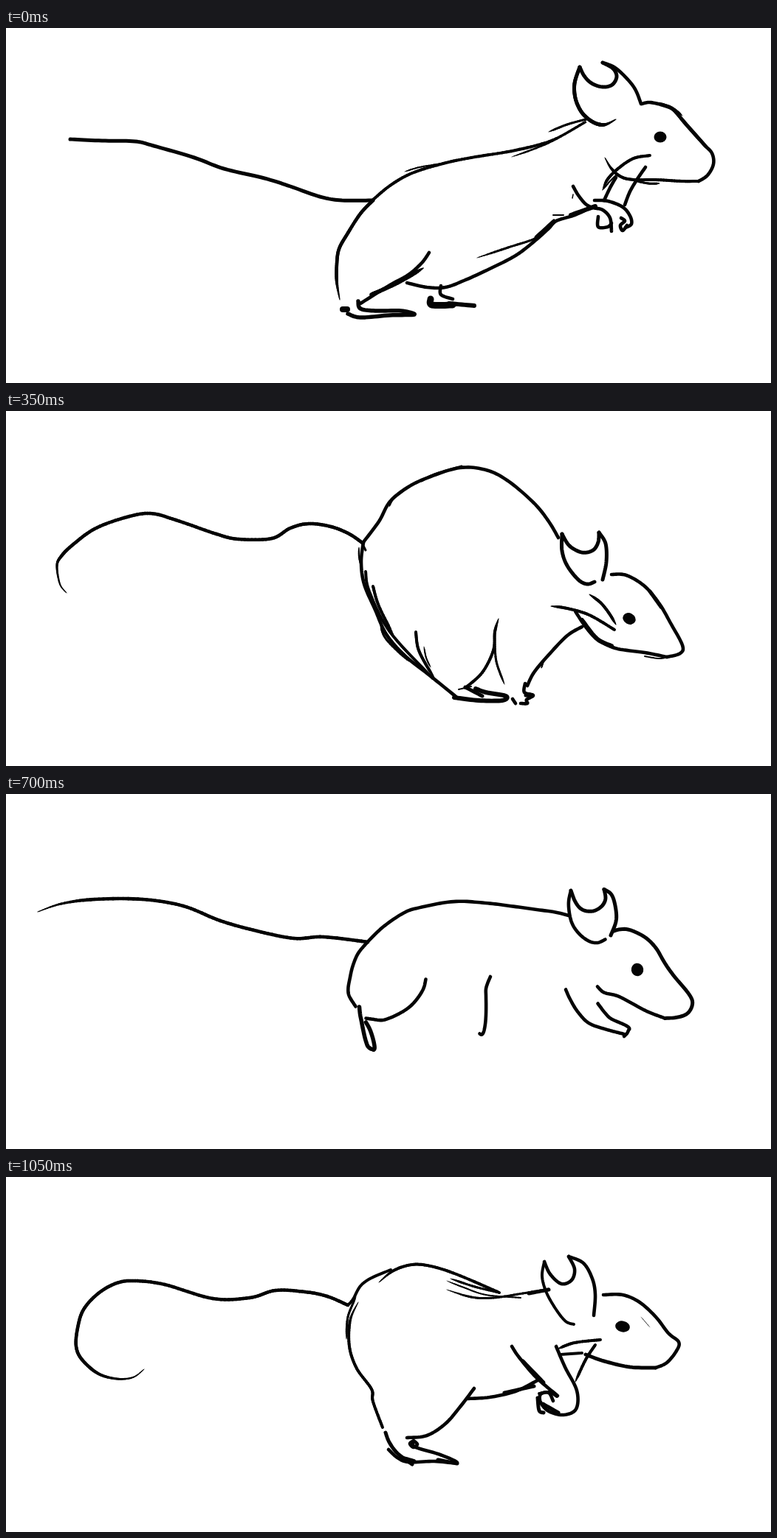
These frames come from a looping animation (1036x482 px, 1120 ms). An HTML page with a canvas:

```html
<!DOCTYPE html>
<html lang="en">
<head>
<meta charset="utf-8">
<title>Running mouse</title>
<style>
html, body { margin: 0; width: 100%; height: 100%; overflow: hidden; background: #fff; }
canvas { display: block; }
</style>
</head>
<body>
<canvas id="stage" width="1036" height="482"></canvas>
<script>
const ctx = document.getElementById('stage').getContext('2d');
const STEP = 70;
const LINE = 4.6;

// A stroke is "width flags: x,y x,y ..."; "<" thins its start, ">" its end.
// Eyes are [x, y, rx, ry, tilt], one for each lap of the run.
const push = {
  eyes: [[886, 148, 8.5, 7.5, 0]],
  tail: '5:87,151 130,153 175,154 200,160 255,176 295,191 350,204 385,215 425,229 455,234 497,234',
  back: '4>:495,235 520,214 550,197 592,184 630,176 690,166 740,152 788,124',
  rump: '>:497,234 480,252 462,280 451,300 448,320 448,345 452,369',
  ear: '5>:777,53 770,75 771,95 778,112 788,123 800,130 812,131 826,124',
  earIn: '5:777,53 783,65 793,75 808,80 821,77 827,66 822,55 808,47',
  earOut: '808,47 825,54 843,71 853,85 860,103',
  head: '861,103 872,101 890,105 905,112 920,130 945,158 956,170 958,185 950,200 938,208',
  jaw: '4>:938,208 915,208 880,206 850,206 833,202 820,191 811,176',
  cheek: '4>:872,173 850,177 830,190 815,205 808,220',
  arm: '768,215 775,227 785,239 795,244 808,247 818,258 820,276',
  paw: '797,234 815,235 835,243 845,255 847,266 839,271',
  belly: '796,242 770,254 745,262 735,272 715,290 690,309 655,327 620,343 595,352 570,352 543,346',
  haunch: '573,305 563,319 545,335 520,349 480,374',
  foot: '5.5:477,371 480,381 500,384 535,384 553,389 520,390 480,393 463,388',
  marks: ['3<:735,141 760,131 785,124', '2.5<:685,175 735,156 785,128', '2<:540,195 560,189 590,184',
    '3<>:880,101 900,107 916,119', '905,112 948,161', '3<>:850,207 870,211 885,211',
    '866,189 855,205 845,222 838,240', '810,234 818,217 826,203', '2<:808,220 818,208 828,198',
    '802,256 802,270 815,270 820,265', '833,258 838,262 832,268 835,275 841,268',
    '3<:638,312 680,298 720,284 745,262', '6:765,254 798,242', '2:741,254 755,254',
    '5:718,284 742,262', '1.5:768,226 767,231', '5.5<:565,326 530,346 495,362',
    '8:456,382 462,382', '589,350 589,362 605,368', '9:575,368 577,376 605,376', '6:600,374 634,377']
};

const leap = {
  eyes: [[893, 174, 7.5, 7, 0]],
  tail: '74,160 95,163 120,159 150,151 185,154 235,166 262,187 308,193 345,210 380,222 410,225 443,237 490,244',
  back: '490,244 515,223 560,197 605,171 660,151 700,139 755,124 781,123',
  rump: '490,244 470,265 460,290 455,315 452,335 456,350 475,368',
  ear: '782,82 780,100 787,125 800,145 815,156 828,156 837,149',
  earIn: '5:782,82 790,98 803,108 820,107 832,98 835,85 831,70',
  earOut: '5:831,70 845,80 855,97 859,112 856,130',
  head: '5:856,130 875,127 895,137 910,155 925,178 955,207 964,222 962,238 950,246 935,248',
  jaw: '935,248 910,239 885,228 848,218',
  cheek: '865,191 850,195 832,210 820,225 813,242',
  arm: '781,211 787,225 800,244 820,258 850,255 882,251',
  paw: '805,226 815,239 825,244 855,240 875,243 882,249 882,256',
  belly: '787,235 765,242 748,250 735,263 715,282 690,302 660,322 630,337 605,342 578,341',
  haunch: '562,295 556,312 540,332 520,347 483,366',
  foot: '5.5:483,366 490,377 510,390 540,391 510,394 478,390',
  marks: ['1.5:68,158 69,158', '2<>:575,197 605,177 632,162', '5>:585,182 607,171 630,164',
    '7:450,322 450,342 457,352', '2:466,287 468,272', '4:781,211 800,201 825,196 850,196 854,199',
    '6:875,127 896,137', '5:910,155 956,208', '5:745,248 780,235', '2<>:669,321 705,293 750,255',
    '3:720,271 750,253', '6:462,362 475,376 500,392', '5:467,373 482,388 525,395',
    '6:484,370 510,390', '5:553,333 578,345', '7:582,350 576,359 588,371', '5:588,371 594,380 604,385',
    '3:595,354 588,358 587,368']
};

const dive = {
  eyes: [[822, 311, 6.5, 9, -.4], [817, 303, 9, 10.5, -.3]],
  tail: '<:55,179 60,163 75,147 95,137 120,132 165,133 220,136 265,144 310,155 340,168 365,178 390,177 408,169 425,157 445,156 472,153 490,157',
  back: '490,157 510,135 535,116 555,114 605,124 640,142 680,168 710,188 743,207',
  rump: '>:490,157 478,180 472,209',
  ear: '748,180 743,200 744,222 755,237 772,247 786,246',
  earIn: '748,180 755,203 768,211 782,207 789,200 789,189',
  earOut: '4>:789,189 798,195 799,210 795,232 782,254',
  head: '788,243 796,240 810,241 835,251 850,263 860,280 875,308 893,335 895,348 882,359 850,361',
  jaw: '4:850,361 825,351 800,336 780,323 760,318 754,305',
  arm: '735,320 750,350 770,380 792,401',
  paw: '798,343 815,365 833,388 832,398 815,399 792,402',
  belly: '525,261 550,279 590,295 640,304 680,311 705,310',
  haunch: '5:575,208 572,222 558,242 540,253 515,260 500,250 492,243',
  foot: '5:474,212 470,235 463,258 453,280 448,295 455,303 470,297 485,275 495,250 497,230',
  marks: ['2<:562,109 590,117 615,126', '5:525,126 550,118', '5:710,188 743,207', '2<>:470,208 480,183 494,154',
    '507,255 510,268 507,282 514,286 523,270 525,262', '5:515,241 524,262', '4>:524,255 526,283',
    '6:470,235 465,255', '3<:670,296 700,303 735,326', '705,303 732,324',
    '4:738,338 765,377 785,398', '4:765,325 780,360 805,393', '3:775,333 795,370 812,393',
    '6:805,398 832,395', '5:828,250 850,263', '3:790,402 800,408']
};

const gather = {
  eyes: [[844, 282, 9, 7.5, .5], [844, 277, 7.5, 9.5, -.5]],
  tail: '4.5<:82,247 73,235 69,210 75,197 90,182 120,160 160,145 195,139 230,148 285,167 315,174 360,173 385,159 410,153 440,157 465,167 484,180',
  back: '484,178 505,150 520,123 545,103 575,89 615,77 650,80 680,95 715,125 735,150 748,172',
  rump: '484,178 481,205 485,235 500,270 515,303 540,332 575,360 612,390',
  ear: '5:753,167 753,190 760,210 775,229 787,235 797,232',
  earIn: '5:753,167 763,183 780,192 795,189 802,178 803,165',
  earOut: '5:803,165 812,180 813,205 808,229',
  head: '820,222 840,223 865,238 885,262 900,288 916,318 913,329 895,334',
  jaw: '895,334 865,328 825,322 800,309 785,293 771,272',
  cheek: '4<:738,265 760,268 790,277 824,297',
  arm: '780,293 760,305 735,331 715,355 706,373',
  paw: '703,370 702,382 714,386 705,392 706,397 697,397',
  haunch: '4<:667,282 662,300 660,325 645,355 622,376',
  foot: '6:607,389 640,393 672,393 677,387 650,382 636,377',
  marks: ['2<>:519,130 525,119 540,108', '3:563,95 580,86 617,75', '3:481,177 487,189',
    '2<>:478,185 478,198 481,212', '4:487,218 492,245 520,300 578,363',
    '4>:497,238 505,265 525,305', '3<>:507,290 515,310 545,340', '4>:555,300 558,322 568,343 580,362',
    '2<>:566,320 569,335 575,348', '3<>:662,310 664,340 675,371', '5:622,375 645,387', '2:613,378 630,374',
    '4<>:790,249 805,260 817,275 826,290', '6:780,284 800,309 820,319', '5:872,245 887,266',
    '2:865,333 885,336 900,333', '2>:729,337 725,349', '686,391 690,397', '5:704,386 713,387']
};

const lift = {
  eyes: [[835, 203, 10, 7.5, .2]],
  tail: '4.5<:187,261 172,272 150,274 125,267 103,248 95,230 97,205 105,180 125,158 150,144 175,141 215,146 280,165 330,164 365,154 405,156 435,162 463,174',
  back: '4<:505,143 525,127 550,119 575,121 610,132 668,157',
  rump: '4<:477,170 466,195 465,230 475,260 495,288 497,305 510,340',
  ear: '4:729,115 726,135 732,157 745,180 758,196 769,200',
  earIn: '729,115 737,132 752,145 766,140 770,125 762,108',
  earOut: '762,108 782,117 794,138 798,160 796,188',
  head: '809,160 835,160 858,170 880,190 897,212 911,224 908,236 895,252 880,259',
  jaw: '5:880,259 845,258 810,250 785,241',
  cheek: '4<:748,233 770,225 805,221',
  arm: '685,230 695,245 718,272 747,297',
  paw: '745,230 757,258 773,290 772,315 755,323 735,318 724,306 724,295 735,293 741,304',
  belly: '720,276 690,291 655,299 625,301',
  haunch: '634,287 615,312 595,335 570,351 543,354',
  foot: '518,370 530,381 545,387 580,386 611,388 588,377 555,367 551,361',
  marks: ['4:463,174 470,166 480,148 495,137 521,126', '3<>:461,220 463,190 474,163', '3<:602,138 635,149 668,157',
    '2<:597,141 620,150 650,160 697,164', '3<:597,153 630,163 660,164 700,158 735,152', '5:708,158 735,153',
    '5:514,347 519,360 530,375 550,390', '6:535,381 552,386', '552,358 557,363 552,367 547,362 552,358',
    '5:585,384 611,389', '5:675,293 715,284', '5:700,250 728,279', '5:720,300 722,317 728,320',
    '5:727,308 748,320', '4:722,294 735,292 746,298', '4>:798,228 785,248 771,278', '4:750,241 780,239',
    '.7<>:860,190 872,204']
};

function parse(text) {
  const [, width, flags, points] = /^(?:([\d.]*)([<>]*):)?(.*)$/.exec(text);
  return {
    width: +width || LINE,
    thinStart: (flags || '').includes('<'),
    thinEnd: (flags || '').includes('>'),
    points: spline(points.split(' ').map(p => p.split(',').map(Number)))
  };
}

// Dense polyline of a Catmull-Rom curve.
function spline(pts) {
  const out = [pts[0]];
  for (let i = 0; i < pts.length - 1; i++) {
    const a = pts[i - 1] || pts[i], b = pts[i], c = pts[i + 1], d = pts[i + 2] || c;
    for (let k = 1; k <= 10; k++) {
      const t = k / 10;
      out.push([0, 1].map(n => b[n] + t / 2 * (c[n] - a[n]
        + t * (2 * a[n] - 5 * b[n] + 4 * c[n] - d[n] + t * (3 * (b[n] - c[n]) + d[n] - a[n])))));
    }
  }
  return out;
}

const lerp = (a, b, t) => a + (b - a) * t;
const mixLists = (a, b) => a.map((v, i) => lerp(v, b[i], .5));

function resample(pts, count) {
  const dist = [0];
  for (let i = 1; i < pts.length; i++) {
    dist.push(dist[i - 1] + Math.hypot(pts[i][0] - pts[i - 1][0], pts[i][1] - pts[i - 1][1]));
  }
  const total = dist[dist.length - 1];
  let i = 1;
  return Array.from({ length: count }, (_, n) => {
    const goal = total * n / (count - 1);
    while (i < pts.length - 1 && dist[i] < goal) i++;
    const t = (goal - dist[i - 1]) / (dist[i] - dist[i - 1] || 1);
    return [0, 1].map(k => lerp(pts[i - 1][k], pts[i][k], t));
  });
}

function build(pose) {
  const parts = {};
  for (const name in pose) {
    if (name !== 'eyes' && name !== 'marks') parts[name] = parse(pose[name]);
  }
  return { eyes: pose.eyes, parts, marks: (pose.marks || []).map(parse) };
}

// Halfway pose; parts given in "own" replace the mixed ones.
function between(a, b, own) {
  const parts = {};
  for (const name in a.parts) {
    const p = a.parts[name], q = b.parts[name];
    if (!q) continue;
    const from = resample(p.points, 80), to = resample(q.points, 80);
    parts[name] = { ...p, points: from.map((v, i) => mixLists(v, to[i])) };
  }
  for (const name in own) parts[name] = parse(own[name]);
  const eyes = [0, 1].map(n => mixLists(a.eyes[n] || a.eyes[0], b.eyes[n] || b.eyes[0]));
  return { eyes, parts, marks: [] };
}

const [A, B, C, D, E] = [push, leap, dive, gather, lift].map(build);
const poses = [
  A, B,
  between(B, C, { tail: '<:43,160 75,149 120,143 185,143 240,152 290,172 340,186 390,196 430,194 490,201' }),
  C,
  between(C, D, { belly: '572,292 610,311 650,321 700,322 738,315' }),
  D,
  between(D, E, { belly: '733,308 705,319 675,324 650,322' }),
  E
];

function drawStroke({ points, width, thinStart, thinEnd }) {
  const last = points.length - 1;
  if (!thinStart && !thinEnd) {
    ctx.lineWidth = width;
    ctx.beginPath();
    points.forEach(p => ctx.lineTo(...p));
    ctx.stroke();
    return;
  }
  for (let i = 0; i < last; i++) {
    const t = (i + .5) / last;
    let press = 1;
    if (thinStart) press = Math.min(press, t * 5);
    if (thinEnd) press = Math.min(press, (1 - t) * 5);
    ctx.lineWidth = width * (.2 + .8 * press);
    ctx.beginPath();
    ctx.moveTo(...points[i]);
    ctx.lineTo(...points[i + 1]);
    ctx.stroke();
  }
}

function draw(time) {
  const step = Math.floor(time / STEP) % 16;
  const { eyes, parts, marks } = poses[step % 8];
  ctx.fillStyle = '#fff';
  ctx.fillRect(0, 0, 1036, 482);
  ctx.strokeStyle = ctx.fillStyle = '#040404';
  ctx.lineCap = ctx.lineJoin = 'round';
  Object.values(parts).forEach(drawStroke);
  marks.forEach(drawStroke);
  const [x, y, rx, ry, tilt] = eyes[step < 8 ? 0 : 1] || eyes[0];
  ctx.beginPath();
  ctx.ellipse(x, y, rx, ry, tilt, 0, 7);
  ctx.fill();
}

const start = performance.now();
function tick() {
  draw(performance.now() - start);
  requestAnimationFrame(tick);
}
tick();
</script>
</body>
</html>
```
